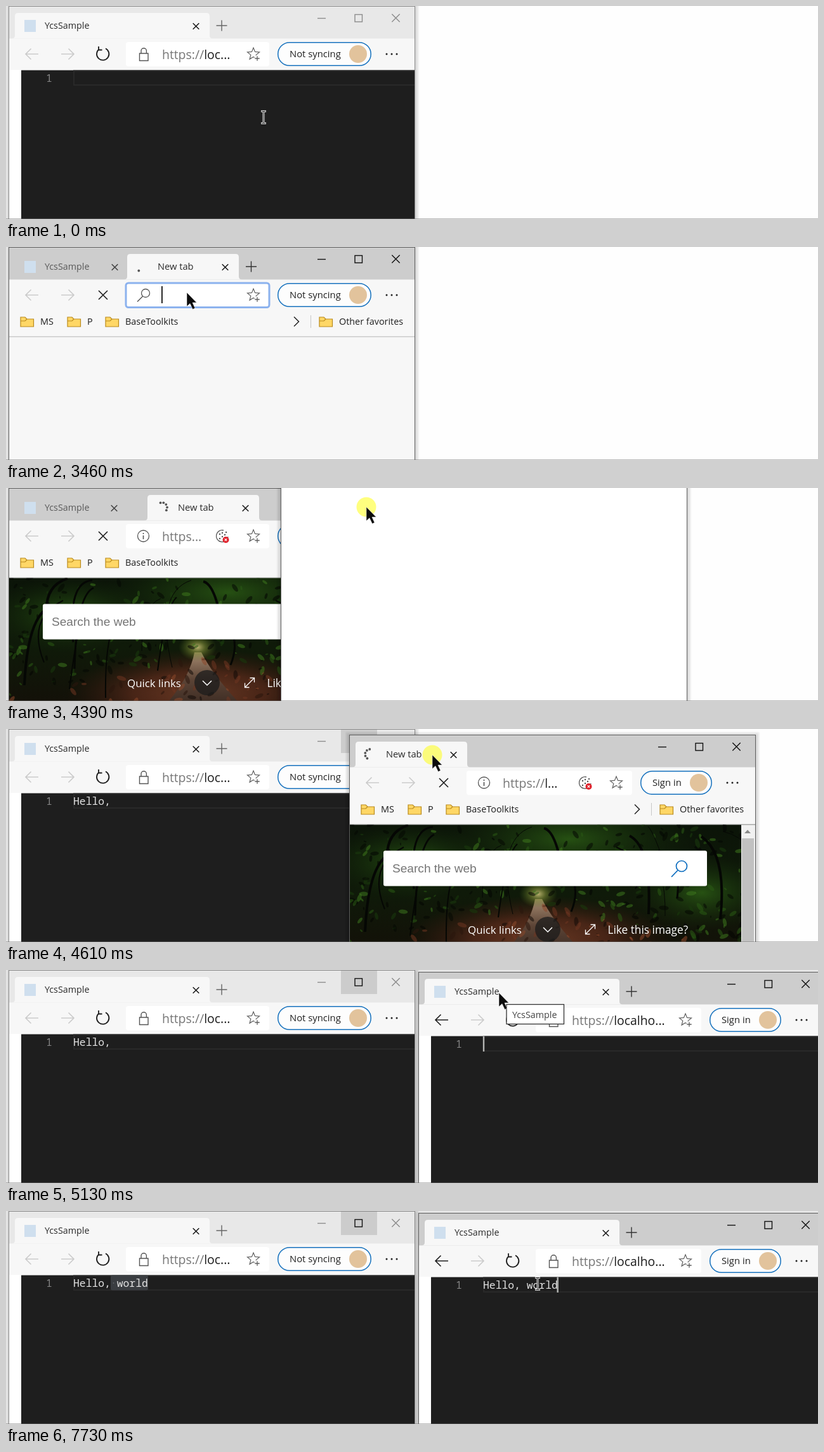
An HTML page for the animation above (8000 ms loop, 1280 by 337 pixels).

```html
<!DOCTYPE html>
<html lang="en">
<head>
<meta charset="utf-8">
<title>Shared editor</title>
<style>
html,body{margin:0;width:100%;height:100%;overflow:hidden;background:#fefefe}
svg{display:block;width:100vw;height:100vh}
text{font-family:"Open Sans","Noto Sans",sans-serif;white-space:pre}
.code{font-family:"Noto Sans Mono","DejaVu Sans Mono",monospace;font-size:16.38px}
.find{font-family:"Liberation Sans",Arial,sans-serif}
</style>
</head>
<body>
<svg viewBox="0 0 1280 337" preserveAspectRatio="none">
<defs>
<linearGradient id="wood" x1="0" y1="0" x2="0" y2="1">
<stop offset="0" stop-color="#0b1408"/><stop offset=".5" stop-color="#0f1a09"/><stop offset="1" stop-color="#140e08"/>
</linearGradient>
<radialGradient id="canopy"><stop offset="0" stop-color="#2f6416" stop-opacity=".75"/><stop offset="1" stop-color="#16300c" stop-opacity="0"/></radialGradient>
<radialGradient id="litter"><stop offset="0" stop-color="#6b3a24"/><stop offset=".5" stop-color="#55291a" stop-opacity=".8"/><stop offset="1" stop-color="#351a10" stop-opacity="0"/></radialGradient>
<radialGradient id="glow"><stop offset="0" stop-color="#b9b070"/><stop offset=".4" stop-color="#7d8a36" stop-opacity=".6"/><stop offset="1" stop-color="#4d6a1c" stop-opacity="0"/></radialGradient>
<linearGradient id="trail" x1="0" y1="0" x2="0" y2="1"><stop offset="0" stop-color="#a58a70"/><stop offset=".5" stop-color="#5c4436"/><stop offset="1" stop-color="#3a2a22"/></linearGradient>
<clipPath id="photoBox"><path d="M5 142.600H644V360H5z"/></clipPath>
<clipPath id="urlBox"><path d="M240 58H376V95H240z"/></clipPath>
<g id="photo" clip-path="url(#photoBox)"></g>
</defs>
<g id="stage"></g>
</svg>
<script>
const LOOP = 8000, CHAR = 9.83;
const $ = id => document.getElementById(id);
const within = (t, ...spans) => spans.some(([a, b]) => t >= a && t < b);
const count = (t, ...times) => times.filter(v => t >= v).length;

const rect = (x, y, w, h, fill, more = '') =>
  `<rect x="${x}" y="${y}" width="${w}" height="${h}" fill="${fill}" ${more}/>`;
const dot = (x, y, r, fill, more = '') => `<circle cx="${x}" cy="${y}" r="${r}" fill="${fill}" ${more}/>`;
const oval = (x, y, rx, ry, fill, more = '') =>
  `<ellipse cx="${x}" cy="${y}" rx="${rx}" ry="${ry}" fill="${fill}" ${more}/>`;
const line = (d, color, w = 1.4, fill = 'none') =>
  `<path d="${d}" stroke="${color}" stroke-width="${w}" fill="${fill}"/>`;
const label = (x, y, str, size, fill = '#1f1f1f', more = '') =>
  `<text x="${x}" y="${y}" font-size="${size}" fill="${fill}" ${more}>${str}</text>`;
const cross = (x, y, r, color, w = 1.5) =>
  line(`M${x - r} ${y - r}L${x + r} ${y + r}M${x + r} ${y - r}L${x - r} ${y + r}`, color, w);
const plus = (x, y, r, color, w = 1.4) => line(`M${x - r} ${y}H${x + r}M${x} ${y - r}V${y + r}`, color, w);

// Position at time t along [time, x, y] points
function along(keys, t) {
  let i = keys.findIndex(k => k[0] > t);
  if (i < 0) return keys[keys.length - 1].slice(1);
  if (i === 0) return keys[0].slice(1);
  const a = keys[i - 1], b = keys[i], p = (t - a[0]) / (b[0] - a[0]);
  return [1, 2].map(n => Math.round(a[n] + (b[n] - a[n]) * p));
}

function buildPhoto() {
  let seed = 7;
  const rnd = () => (seed = seed * 16807 % 2147483647) / 2147483647;
  const pick = list => list[Math.floor(rnd() * list.length)];
  const leaves = ['#030502', '#050903', '#1a3b0d', '#2a5a14', '#3d751d'];
  const ground = ['#120b07', '#2a150d', '#6d3520', '#8b4729'];
  let s = rect(5, 142, 640, 220, 'url(#wood)') +
    oval(350, 165, 200, 65, 'url(#canopy)') + oval(100, 200, 130, 60, 'url(#canopy)') + oval(560, 250, 110, 60, 'url(#canopy)') +
    oval(305, 325, 210, 70, 'url(#litter)') +
    '<path d="M297 260H308Q325 295 372 345H250Q290 300 297 260Z" fill="url(#trail)"/>' +
    oval(302, 252, 30, 22, 'url(#glow)');
  for (let i = 0; i < 380; i++) {
    const x = 5 + rnd() * 640, y = 142 + rnd() * 200, r = 2 + rnd() * 6;
    const low = y > 268 + Math.abs(x - 302) * .22;
    const turn = Math.floor(rnd() * 180);
    s += oval(x.toFixed(0), y.toFixed(0), r.toFixed(1), (r * .45).toFixed(1), pick(low ? ground : leaves),
      `opacity=".55" transform="rotate(${turn} ${x.toFixed(0)} ${y.toFixed(0)})"`);
  }
  for (let i = 0; i < 20; i++) {
    const x = rnd() * 640, y = 142 + rnd() * 60, side = x < 302 ? -1 : 1;
    s += line(`M${x | 0} ${y | 0}q${side * (10 + rnd() * 60) | 0} ${rnd() * 30 | 0} ${side * 30} ${60 + rnd() * 80 | 0}`, '#050704', 1 + i % 4);
  }
  $('photo').innerHTML = s;
}

const folder = x => line(`M${x} 111h7l3 3h10.500v12H${x}z`, '#b98a1c', 1.2, '#ffd766') +
  line(`M${x} 117h7l3-3`, '#b98a1c', 1.2);

function star(x, y) {
  let d = '';
  for (let i = 0; i < 10; i++) {
    const a = -Math.PI / 2 + i * Math.PI / 5, r = i % 2 ? 4.4 : 10;
    d += (i ? 'L' : 'M') + (x + r * Math.cos(a)).toFixed(1) + ' ' + (y + r * Math.sin(a)).toFixed(1);
  }
  return line(d + 'z', '#5f5f5f', 1.2) + dot(x + 6, y + 6.5, 4.5, '#fff') + plus(x + 6, y + 7, 3.7, '#5f5f5f', 1.3);
}

const cookie = (x, y) =>
  line(`M${x + 2} ${y - 9}A9.300 9.300 0 1 0 ${x + 9} ${y + 1}`, '#555', 1.3) +
  [[-4, -3], [0, 1], [-4, 4], [4, -2], [6, -6], [0, -5]].map(([a, b]) => dot(x + a, y + b, 1.2, '#555')).join('') +
  dot(x + 5.5, y + 6, 5, '#e0202a') + cross(x + 5.5, y + 6, 1.8, '#fff', 1.2);

const siteIcons = {
  lock: line('M210.500 75h13.500v11.500h-13.500zM213 75v-4a4.200 4.200 0 0 1 8.400 0v4', '#555'),
  info: dot(216.5, 76, 9, 'none', 'stroke="#555" stroke-width="1.3"') + line('M216.500 75V81M216.500 71V73', '#555', 1.6),
  find: dot(220, 73, 6.5, 'none', 'stroke="#555" stroke-width="1.3"') + line('M215.500 78L207 86.500', '#555')
};

function spinner(x, t) {
  const lead = 125 + (t - 3460) * 1.06, n = Math.min(5, 1 + Math.floor((t - 3460) / 90));
  let s = '';
  for (let i = 0; i < n; i++) {
    const a = (lead - i * 35) * Math.PI / 180;
    s += dot((x + 8 * Math.cos(a)).toFixed(1), (31 + 8 * Math.sin(a)).toFixed(1), 1.9, '#555');
  }
  return s;
}

function tab(o, t) {
  const { x, w, title, on = true, spin, close = x + w - 21.5 } = o;
  let s = on ? `<path d="M${x - 5} 51.500q5 0 5-5V16q0-5 5-5H${x + w - 5}q5 0 5 5V46.500q0 5 5 5z" fill="#f7f7f7"/>` : '';
  s += spin ? spinner(x + 23, t) : rect(x + 15, 22, 18, 19, '#cfdfee');
  return s + label(x + (spin ? 48 : 47), 36, title, spin ? 14.7 : 14.3, on ? '#2a2a2a' : '#5a5a5a') +
    cross(close, 32, 4.8, on ? '#1c1c1c' : '#444', 1.6);
}

function urlField(o) {
  const end = o.wide ? 450 : 415, w = end - 189;
  let s = rect(189, 57, w, 38.5, '#fff', 'rx="4"');
  if (o.focus) s += rect(189, 57, w, 38.5, 'none', 'rx="4" stroke="#8cb2ee" stroke-width="3"');
  s += siteIcons[o.icon] + star(end - 25, 76) + (o.cookie ? cookie(end - 74, 76) : '');
  if (o.select)
    s += '<g clip-path="url(#urlBox)">' + rect(246, 64, 130, 25, '#0078d7') + label(246, 83.5, 'https://localhost', 19.4, '#fff') + '</g>';
  else if (o.url)
    s += label(246, 83.5, `${o.url[0]}<tspan fill="#1c1c1c">${o.url[1]}</tspan>`, 19.4, '#767676');
  if (o.caret) s += rect(245, 62, 1.8, 27, '#111');
  return s;
}

function toolbar(o) {
  const arrow = (x, dir, c) => line(`M${x + 10 * dir} 76H${x - 10 * dir}M${x - 1.5 * dir} 67.500L${x - 10 * dir} 76L${x - 1.5 * dir} 84.500`, c, 1.6);
  const left = o.wide ? 463 : 428;
  return arrow(41, 1, o.back ? '#1c1c1c' : '#cbcbcb') + arrow(97, -1, '#cbcbcb') +
    (o.busy ? cross(153, 76, 7, '#1c1c1c', 1.6)
      : line('M146.500 68.500A9.700 9.700 0 1 0 157 67.300M146 64v5.500h5.500', '#1c1c1c', 1.8)) +
    urlField(o) +
    rect(left + .7, 57.7, 574.5 - left, 36.6, '#fdfdfd', 'rx="18.3" stroke="#1470bd" stroke-width="1.5"') +
    label(left + 19, 81, o.wide ? 'Sign in' : 'Not syncing', 14.8) +
    dot(555, 76, 14, '#e2c39c') + [600, 608, 616].map(x => dot(x, 76, 1.5, '#222')).join('');
}

const favorites = rect(5, 101, 640, 41, '#f7f7f7') + line('M5 141.900H644', '#c2c2c2', 1.2) +
  folder(23) + label(54, 123, 'MS', 14.4) + folder(97) + label(128, 123, 'P', 14.4) +
  folder(157) + label(188, 123, 'BaseToolkits', 14.4) +
  line('M454 110.500L461.500 118L454 125.500', '#222', 1.5) + line('M480.500 108V128', '#c8c8c8', 1) +
  folder(494) + label(525, 123, 'Other favorites', 14.4);

const startPage = '<use href="#photo"/>' + rect(58, 183.5, 510, 56, '#fff', 'rx="3"') +
  label(72, 218, 'Search the web', 19.1, '#757575', 'class="find"') +
  dot(528, 208, 8.5, 'none', 'stroke="#0b6cbf" stroke-width="1.7"') + line('M522 214.500L512 225', '#0b6cbf', 1.8) +
  label(191, 315, 'Quick links', 16.9, '#fff') + dot(317, 308, 20, '#1b1b1b', 'opacity=".75"') +
  line('M310 305L317 312L324 305', '#fff', 1.5) +
  line('M376.500 315.500L391.500 300.500M384.500 300.500H391.500V307.500M376.500 308.500V315.500H383.500', '#fff', 1.3) +
  label(411.5, 315, 'Like this image?', 17.3, '#fff') +
  rect(622, 142.6, 22, 220, '#f1f1f1') + rect(623, 164, 19, 198, '#c1c1c1') +
  '<path d="M627 156h10l-5-5.500z" fill="#8a8a8a"/>';

function editor({ text, caret, remote }) {
  let s = rect(5, 101, 20, 260, '#fff') + rect(24, 101.6, 621, 260, '#1e1e1e') +
    line('M645 102.500H107V125H645', '#292929', 2);
  if (remote)
    s += rect(165, 101.6, remote * CHAR, 24, '#3a3d41', 'rx="3"') + dot(169.5, 114, 1, '#60646a');
  s += label(63, 120, '1', 16.38, '#858585', 'class="code"') +
    label(106, 120, text, 16.38, '#e2e2e2', 'class="code"');
  if (caret) s += rect(105.8 + text.length * CHAR - (text ? 1.3 : 0), 101.6, 2.4, 24.4, '#b4b5b3');
  return s;
}

function frame(o, t) {
  let s = `<g transform="translate(${o.dx || 0} ${o.dy || 0})">`;
  for (let i = 1; i < 8; i++) s += rect(4.5 - i, 2 - i, 640 + 2 * i, 400, '#000', 'opacity=".026" rx="3"');
  if (o.blank) s += rect(4, 0, 641, 400, '#fff');
  else {
    const ink = o.active ? '#111' : '#8c8c8c';
    s += rect(4, 0, 641, 52, o.active ? '#cdcdcd' : '#e8e8e8') + rect(4, 51.5, 641, 320, '#f7f7f7');
    if (o.hover) s += rect(528, 0, 57, 38, '#cccccc');
    s += line('M491 19.500H504', ink) + rect(550, 13.5, 11.5, 11.5, 'none', `stroke="${o.hover ? '#111' : ink}" stroke-width="1.4"`) +
      cross(614.5, 19, 6.2, ink, 1.4);
    s += o.tabs.map(v => tab(v, t)).join('');
    if (o.plus) s += plus(o.plus, 31, 8.5, o.active ? '#333' : '#666');
    s += toolbar(o) + o.body;
  }
  return s + rect(4.5, .5, 640, 400, 'none', `stroke="${o.active ? '#5e5e5e' : '#8a8a8a'}"`) + '</g>';
}

const sample = { tabs: [{ x: 14, w: 307, title: 'YcsSample' }], plus: 340, icon: 'lock' };

function leftWindow(t) {
  if (within(t, [3460, 4450])) {
    const x = 191 + 32 * Math.min(1, Math.max(0, (t - 4130) / 100));
    const sent = t >= 3850, pasted = t >= 3700;
    return frame({
      active: true, busy: true, plus: t < 4130 && 386.5, focus: !sent, caret: !pasted,
      tabs: [{ x: 14, w: 177, title: 'YcsSample', on: false, close: t < 4330 ? 171.5 : 170.5 }, { x, w: 176, title: 'New tab', spin: true }],
      icon: sent ? 'info' : 'find', cookie: sent, url: pasted && ['https...', ''],
      body: favorites + (t < 3620 ? '' : startPage)
    }, t);
  }
  const extra = count(t, 6840, 7460, 7530, 7590, 7660, 7730);
  const text = 'Hello,'.slice(0, count(t, 1140, 1230, 1320, 1420, 1510, 1670)) + ' world'.slice(0, extra);
  const caret = within(t, [570, 830], [1140, 1980], [2380, 2570]);
  return frame({
    ...sample, active: within(t, [520, 4450]), hover: t >= 4450, url: ['https://', 'loc...'],
    focus: within(t, [2570, 3460]), select: within(t, [2570, 3460]),
    body: editor({ text, caret, remote: t >= 6920 ? extra : 0 })
  }, t);
}

const drag = [[4330, 385, -1], [4390, 429, -1], [4610, 537, 9], [4850, 646, 3]];

function rightWindow(t) {
  if (t < 4330) return '';
  const [dx, dy] = along(drag, t), base = { dx, dy, active: true, wide: true };
  if (t < 4450) return frame({ ...base, blank: true }, t);
  if (t < 4950) return frame({
    ...base, busy: true, icon: 'info', cookie: true, url: ['https://', 'l...'],
    tabs: [{ x: 14, w: 176, title: 'New tab', spin: true }], body: favorites + startPage
  }, t);
  const text = t < 5340 ? '' : 'Hello,' + ' world'.slice(0, count(t, 6760, 7400, 7460, 7530, 7590, 7660));
  const caret = within(t, [5040, 5840], [6080, 6400], [6760, 7240], [7400, LOOP]);
  return frame({ ...base, ...sample, back: true, url: ['https://', 'localho...'], body: editor({ text, caret }) }, t);
}

const path = [[0, 406, 176], [2190, 406, 176], [2410, 285, 72], [3850, 285, 72], [4050, 312, 31], [4130, 312, 31],
  [4230, 344, 31], [4329, 344, 31], [4330, 522, 31], [4390, 568, 30], [4610, 672, 41], [4850, 777, 36],
  [5590, 777, 36], [6020, 838, 115]];

function pointer(t) {
  const [x, y] = along(path, t);
  const arrow = t >= 3460 && !(t > 5590 && y > 104);
  const pressed = within(t, [2570, 2680], [4120, 4880], [6080, 6240]);
  let s = pressed ? dot(0, 0, 15.5, '#ffff00', 'opacity=".5"') : '';
  s += arrow
    ? '<path d="M0 0V22L5 17.500L9.300 26.500L13 24.800L9 16H15.500z" fill="#0c0c0c" stroke="#fff" stroke-width=".5"/>'
    : line('M-4-9.500H4M-4 9.500H4M0-9.500V9.500', '#e6e6e6', 3) + line('M-3.500-9.500H3.500M-3.500 9.500H3.500M0-9.500V9.500', '#222', 1);
  return `<g transform="translate(${x} ${y})">${s}</g>`;
}

function draw(t) {
  let s = rect(0, 0, 1280, 337, '#fefefe') + leftWindow(t) + rightWindow(t);
  if (within(t, [5110, 5600]))
    s += rect(789, 54.5, 90.5, 31, '#fff', 'stroke="#333" stroke-width="1.3"') + label(798, 75.5, 'YcsSample', 14.3, '#444');
  return s + pointer(t) + rect(0, 336, 1280, 1, '#777', 'opacity=".5"');
}

let last = '';
function tick() {
  const next = draw(performance.now() % LOOP);
  if (next !== last) $('stage').innerHTML = last = next;
  requestAnimationFrame(tick);
}
buildPhoto();
tick();
</script>
</body>
</html>
```
